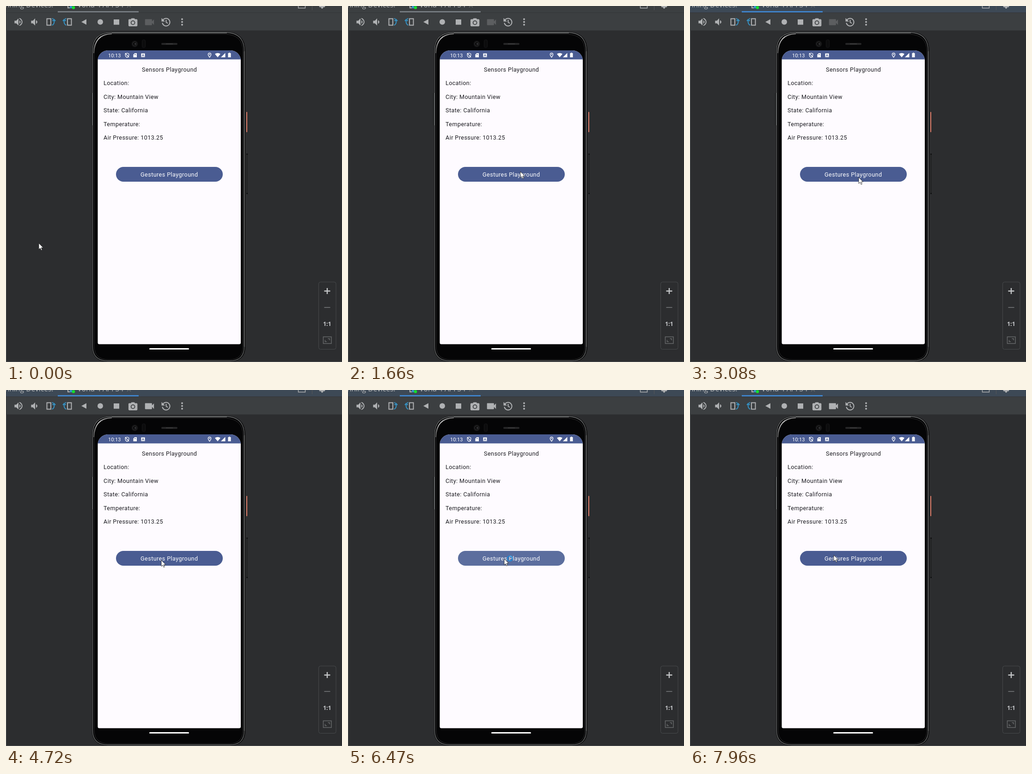
An HTML page that plays this animation: 727 by 770 pixels, repeating every 8 s.

```html
<!DOCTYPE html>
<html lang="en">
<head>
<meta charset="utf-8">
<title>Sensors Playground</title>
<style>
  html, body { margin: 0; width: 100%; height: 100%; overflow: hidden; background: #2c2d2f; }
  svg { display: block; width: 727px; height: 770px; }
  .ide { font: 15.6px "Open Sans", sans-serif; fill: #b4b6b8; }
  .app { font: 12.63px Roboto, sans-serif; letter-spacing: .41px; fill: #1b1b20; }
  .line { fill: none; stroke: #afb1b3; stroke-width: 2; }
  .thin { stroke-width: 1.4; }
</style>
</head>
<body>
<svg viewBox="0 0 727 770">
  <defs>
    <linearGradient id="glare" x1="0" y1="1" x2="1" y2="0">
      <stop offset="0" stop-color="#555"/><stop offset=".5" stop-color="#c8c8c8"/><stop offset="1" stop-color="#777"/>
    </linearGradient>
    <g id="rotate">
      <rect class="line" x="88.5" y="27.5" width="8.5" height="14"/>
      <path d="M99.5 41.5Q105.5 39.5 104 31M100.5 32.5L104 29L107 32.5M99.5 27.5h3" fill="none" stroke="#3592c4" stroke-width="2"/>
    </g>
    <clipPath id="screen"><path d="M198.500 731.500V118a22 22 0 0 1 22-22H486a22 22 0 0 1 22 22V728a3.500 3.500 0 0 1-3.500 3.500H202a3.500 3.500 0 0 1-3.500-3.500z"/></clipPath>
  </defs>

  <!-- tool window header -->
  <rect width="727" height="53" fill="#3c3f41"/>
  <rect id="header" width="727" height="14" fill="#3c3f41"/>
  <rect y="14" width="727" height="1" fill="#333537"/>
  <rect id="tabLine" x="112" y="11" width="175" height="3" fill="#747a80"/>
  <text class="ide" x="102.500" y="2.500" text-anchor="end">Running Devices:</text>
  <text class="ide" x="154.500" y="2.500">Vorla 4 API 34</text>
  <path d="M262-5l8 8m0-8l-8 8" stroke="#6e7173" stroke-width="1.300"/>
  <path class="line" d="M134-3V4H140"/>
  <path d="M138 0h5v5h-5z" fill="#3592c4"/>
  <circle cx="146" cy="3.500" r="3.300" fill="#14e02c"/>
  <path class="line thin" d="M632.500-2V4.500H647.500V-2"/>
  <path d="M662.500 0V9" stroke="#555759"/>
  <path d="M677 0H691L689 3L686.500 2.500L685.500 5.500H682.500L681.500 2.500L679 3z" fill="#afb1b3"/>

  <!-- device toolbar -->
  <g fill="#afb1b3">
    <path transform="translate(15.500 23) scale(.96)" d="M3 9v6h4l5 5V4L7 9H3zm13.500 3c0-1.770-1.020-3.290-2.500-4.030v8.050c1.480-.73 2.500-2.250 2.500-4.020zM14 3.230v2.060c2.890.86 5 3.540 5 6.710s-2.110 5.850-5 6.710v2.060c4.010-.91 7-4.490 7-8.770s-2.990-7.860-7-8.770z"/>
    <path transform="translate(51.500 23) scale(.96)" d="M3 9v6h4l5 5V4L7 9H3zm14 3c0-1.770-1.020-3.290-3-4.030v8.050c1.980-.73 3-2.250 3-4.020z"/>
    <use href="#rotate"/>
    <use href="#rotate" transform="matrix(-1 0 0 1 230 0)"/>
    <path d="M163 34.500L174 28.500V40.500z"/>
    <circle cx="204" cy="34.500" r="6"/>
    <rect x="233" y="29" width="12" height="11.500"/>
    <path transform="translate(263 24.500) scale(.97)" fill-rule="evenodd" d="M9 2L7.170 4H4c-1.100 0-2 .9-2 2v12c0 1.100.9 2 2 2h16c1.100 0 2-.9 2-2V6c0-1.100-.9-2-2-2h-3.170L15 2zM7 12a5 5 0 1 0 10 0a5 5 0 1 0-10 0zM8.800 12a3.200 3.200 0 1 1 6.400 0a3.200 3.200 0 1 1-6.400 0z"/>
    <path id="video" transform="translate(297.500 22) scale(1.080)" d="M17 10.500V7c0-.55-.45-1-1-1H4c-.55 0-1 .45-1 1v10c0 .55.45 1 1 1h12c.55 0 1-.45 1-1v-3.500l4 4v-11z"/>
    <circle cx="381" cy="28.500" r="2"/><circle cx="381" cy="34.500" r="2"/><circle cx="381" cy="40.500" r="2"/>
    <path d="M336.500 26V33.500H344z"/>
  </g>
  <path class="line" d="M339.500 30.500A8.200 8.200 0 1 1 338.300 36.500M346.500 30V35L350 37.500"/>
  <rect y="52.500" width="727" height="1" fill="#323436"/>

  <!-- phone body -->
  <rect x="520" y="319" width="2.500" height="88" rx="1" fill="#212223"/>
  <path d="M520 320.500h3M520 405.500h3" stroke="#0a0a0a" stroke-width="2"/>
  <rect x="520" y="229" width="2" height="44" rx="1" fill="#dc7a66"/>
  <path d="M186.500 96Q187 56.500 228 56.500H476Q517.500 56.500 517.500 98V737Q517.500 768.500 485 768.500H220Q186.500 768.500 186.500 737z" fill="#050506" stroke="#111"/>
  <path d="M187.500 96Q188 57.500 228 57.500H476Q515.500 58 515.500 98V737Q515 767 485 767.500H220Q188 767 187.500 737z" fill="none" stroke="#6a6c6d" stroke-width="1.300"/>
  <path d="M191 737V98Q191.500 61 229 61H474Q512.500 62 512.500 98V737Q512 764 484 765H221Q191.500 764 191 737z" fill="none" stroke="#29292a"/>
  <path d="M190 102Q191 61 229 60" fill="none" stroke="url(#glare)" stroke-width="2"/>
  <path d="M229 58.500H478" stroke="#858687"/>
  <path d="M515.500 98V737" stroke="#77797a" stroke-width="1.500"/>
  <path d="M185.500 188V258" stroke="#151516" stroke-width="2"/>
  <path d="M186.500 188V258" stroke="#666869"/>
  <circle cx="278.500" cy="82" r="7" fill="#151516"/>
  <circle cx="278.500" cy="82" r="4" fill="#050505" stroke="#303032"/>
  <circle cx="279.500" cy="82" r="1.500" fill="#4d4d52"/>
  <rect x="294.500" y="73" width="7" height="17" rx="3" fill="#0c0c0d" stroke="#171718"/>
  <rect x="336" y="80" width="35" height="4" rx="2" fill="#262627"/>
  <path d="M346 82h15" stroke="#3b3b3c" stroke-width="1.500"/>

  <!-- phone screen -->
  <g clip-path="url(#screen)">
    <rect x="198" y="96" width="311" height="636" fill="#fefbff"/>
    <rect x="198" y="96" width="311" height="19.500" fill="#4a5c92"/>
  </g>
  <rect x="310" y="740" width="86" height="3" rx="1.500" fill="#fff"/>
  <text x="221" y="110.700" style="font:11px Roboto,sans-serif" fill="#fff">10:13</text>
  <g fill="#fff">
    <path d="M262 101.800L265.800 103.300V106.500Q265.500 109.800 262 111.500Q258.500 109.800 258.200 106.500V103.300zM258 102l8 9" fill="none" stroke="#fff" stroke-width="1.200"/>
    <path d="M278.500 102H283V111H275.500V105z"/>
    <path d="M278.500 104v2m2-2v2" stroke="#4a5c92"/>
    <rect x="292.500" y="102.500" width="8" height="8"/>
    <path d="M294.500 109l2-5 2 5M295.300 107.500h2.400" fill="none" stroke="#4a5c92"/>
    <path d="M440.500 111Q437.300 107.300 437.300 104.800A3.200 3.200 0 0 1 443.700 104.800Q443.700 107.300 440.500 111z" fill="none" stroke="#fff" stroke-width="1.200"/>
    <circle cx="440.500" cy="104.800" r="1.200"/>
    <path d="M452 103.800Q458 99.500 464 103.800L458 111z"/>
    <path d="M474.500 101.500V111H465z"/>
    <path d="M482 101h3v1h1.500v9h-6v-9H482z"/>
  </g>
  <g id="labels" class="app"></g>
  <rect id="button" x="238" y="348" width="231" height="32" rx="16" fill="#4a5c92"/>
  <text class="app" x="353.300" y="369" text-anchor="middle" style="fill:#fff">Gestures Playground</text>

  <!-- zoom controls -->
  <rect x="676.500" y="597" width="37.500" height="145.500" rx="4" fill="#2c2d2f" stroke="#47494b"/>
  <path d="M688.500 616.500h13M695 610v13" stroke="#c4c6c8" stroke-width="2.400"/>
  <path d="M688.500 652h13" stroke="#66686a" stroke-width="2"/>
  <text x="694.800" y="692" text-anchor="middle" style="font:bold 12.500px 'Open Sans',sans-serif" fill="#c4c6c8">1:1</text>
  <g fill="none" stroke="#66686a" stroke-width="1.500">
    <rect x="686.500" y="715.500" width="17.500" height="14.500"/>
    <path d="M696.500 719.500h3.500v3.500M690.500 722.500v3.500h3.500"/>
  </g>

  <path d="M.5 53V770M0 769.500H727" stroke="#505254"/>
  <g id="cursor">
    <path d="M0 0V13.500L3.100 10.700L5.200 15.500L7.300 14.600L5.200 9.900H9.500z" fill="#fff" stroke="#1a1a1a" stroke-width=".8" stroke-linejoin="round"/>
    <g id="busy" fill="none" stroke-width="2.600">
      <circle cx="12.300" cy="-.5" r="5.200" stroke="#2387d3"/>
      <path d="M12.300-5.700A5.200 5.200 0 0 1 17.500-.5" stroke="#4ba6e6"/>
    </g>
  </g>
</svg>
<script>
const LOOP = 8000, STEP = 120;
const $ = id => document.getElementById(id);

const labels = ["Location:", "City: Mountain View", "State: California", "Temperature:", "Air Pressure: 1013.25"];
$("labels").innerHTML =
  '<text x="353.700" y="141.500" text-anchor="middle">Sensors Playground</text>' +
  labels.map((s, i) => `<text x="211" y="${Math.round(171 + i * 29.55)}">${s}</text>`).join("");

// Pointer moves: start time, number of steps, end position
const start = [71, 513];
const moves = [
  [370, 4, 338, 366], [1010, 1, 338, 365], [1540, 2, 373, 358], [2310, 3, 365, 370.5],
  [3990, 4, 344, 355], [4600, 2, 336, 368], [6180, 1, 338, 368], [6320, 1, 338, 367],
  [6470, 1, 338, 365], [7720, 3, 311, 357]
];

const within = (t, a, b) => t >= a && t < b;
const smooth = p => p * p * (3 - 2 * p);

function pointer(t) {
  let [x, y] = start;
  for (const [at, steps, endX, endY] of moves) {
    if (t < at) break;
    const p = smooth(Math.min(1, (Math.floor((t - at) / STEP) + 1) / steps));
    x += (endX - x) * p;
    y += (endY - y) * p;
  }
  return [x, y];
}

function draw(t) {
  const focused = t >= 3080;
  const pressed = within(t, 5220, 5340) || within(t, 6470, 6970);
  $("header").setAttribute("fill", focused ? "#3d4956" : "#3c3f41");
  $("tabLine").setAttribute("fill", focused ? "#4083c9" : "#747a80");
  $("video").setAttribute("fill", t >= 3990 ? "#afb1b3" : "#5c5e60");
  $("button").setAttribute("fill", pressed ? "#5c6e9e" : "#4a5c92");
  $("busy").setAttribute("visibility", within(t, 6030, 7720) ? "visible" : "hidden");
  $("cursor").setAttribute("transform", `translate(${pointer(t)})`);
}

const began = performance.now();
function tick() {
  draw((performance.now() - began) % LOOP);
  requestAnimationFrame(tick);
}
draw(0);
requestAnimationFrame(tick);
</script>
</body>
</html>
```
